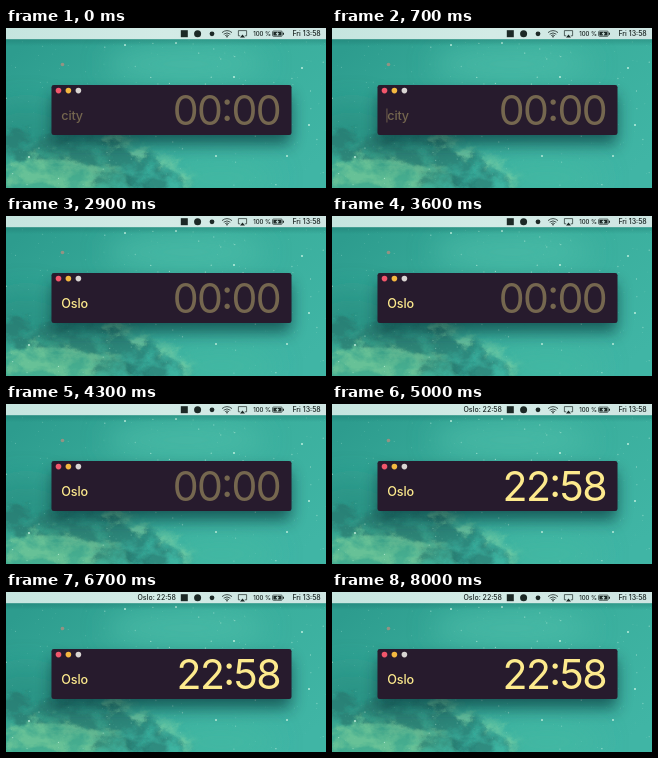
An HTML page that plays this animation: 320 px wide and 160 px high, repeating every 8.1 s.

```html
<!DOCTYPE html>
<html lang="en">
<head>
<meta charset="utf-8">
<title>City clock</title>
<style>
  html, body { margin: 0; width: 100%; height: 100%; overflow: hidden; background: #3aab9b; }
  svg { display: block; width: 100vw; height: 100vh; }
  text { font-family: Inter, Roboto, sans-serif; }
  .bar text { font-size: 7px; font-weight: 500; fill: #17211f; }
  .bar .small { font-size: 6px; }
  #city { font-size: 12.6px; font-weight: 500; letter-spacing: -.15px; }
  #clock { font-size: 41px; letter-spacing: -1.6px; text-anchor: end; font-feature-settings: "case" 1; }
</style>
</head>
<body>
<svg viewBox="0 0 320 160">
  <defs>
    <linearGradient id="sky" x1="0" y1=".2" x2="1" y2=".8">
      <stop offset="0" stop-color="#2d9c8e"/>
      <stop offset=".45" stop-color="#39ad9b"/>
      <stop offset="1" stop-color="#40b5a5"/>
    </linearGradient>
    <linearGradient id="glass">
      <stop offset="0" stop-color="#c5e5df"/>
      <stop offset=".5" stop-color="#d3ebe6"/>
      <stop offset="1" stop-color="#cee5e2"/>
    </linearGradient>
    <linearGradient id="edge" x1="0" y1="0" x2="0" y2="1">
      <stop offset="0" stop-color="#176b62" stop-opacity=".35"/>
      <stop offset="1" stop-color="#176b62" stop-opacity="0"/>
    </linearGradient>
    <filter id="soft" x="-60%" y="-60%" width="220%" height="220%"><feGaussianBlur stdDeviation="13"/></filter>
    <filter id="mist" x="-20%" y="-30%" width="140%" height="160%">
      <feTurbulence type="fractalNoise" baseFrequency=".05 .065" numOctaves="5" seed="7" result="noise"/>
      <feGaussianBlur in="SourceGraphic" stdDeviation="2.5" result="cloud"/>
      <feDisplacementMap in="cloud" in2="noise" scale="30" xChannelSelector="R" yChannelSelector="G" result="torn"/>
      <feColorMatrix in="noise" values="0 0 0 0 1  0 0 0 0 1  0 0 0 0 1  3 0 0 0 -.8" result="mask"/>
      <feComposite in="torn" in2="mask" operator="in"/>
    </filter>
    <filter id="shade" x="-20%" y="-80%" width="140%" height="280%"><feGaussianBlur stdDeviation="7.5"/></filter>
  </defs>

  <rect width="320" height="160" fill="url(#sky)"/>
  <g filter="url(#soft)">
    <ellipse cx="180" cy="36" rx="80" ry="20" fill="#50c0aa" opacity=".6"/>
    <ellipse cx="215" cy="150" rx="55" ry="20" fill="#45bba4" opacity=".6"/>
    <ellipse cx="20" cy="100" rx="40" ry="25" fill="#238578" opacity=".5"/>
    <ellipse cx="80" cy="124" rx="55" ry="14" fill="#267f70" opacity=".6"/>
    <ellipse cx="45" cy="152" rx="65" ry="16" fill="#50b18d" opacity=".8"/>
  </g>
  <g filter="url(#mist)">
    <path d="M0 98Q35 104 62 110T125 114Q143 118 153 132T188 160H100Q75 135 0 125Z" fill="#24746a" opacity=".6"/>
    <path d="M0 138Q30 124 60 131T112 140L130 160H0Z" fill="#74c99a" opacity=".75"/>
    <path d="M98 112Q135 112 151 126T185 156" fill="none" stroke="#79cfa4" stroke-width="9" opacity=".75"/>
    <path d="M90 151Q110 136 135 150T155 160H90Z" fill="#247a70" opacity=".7"/>
  </g>
  <g id="stars" fill="#c8f5e3"></g>
  <circle cx="56.5" cy="36.5" r="1.8" fill="#b58d7e" opacity=".75"/>

  <rect y="11" width="320" height="7" fill="url(#edge)"/>
  <rect width="320" height="11.2" fill="url(#glass)"/>
  <g class="bar">
    <text id="menu" x="131.5" y="8.3">Oslo: 22:58</text>
    <g fill="#1c2926">
      <rect x="174.8" y="2.2" width="7" height="7"/>
      <circle cx="191.6" cy="5.7" r="3.5"/>
      <circle cx="206" cy="5.8" r="2.4"/>
      <circle cx="221" cy="8.7" r=".8"/>
    </g>
    <g fill="none" stroke="#1c2926">
      <path d="M216 4.6Q221 .6 226 4.6M217.7 6.2Q221 3.6 224.3 6.2M219.2 7.6Q221 6.3 222.8 7.6" stroke-width=".8"/>
      <path d="M234.2 7.8H232.4V2.6H240.6V7.8H238.8" stroke-width=".7"/>
      <rect x="266.6" y="3.1" width="9.6" height="5.2" rx=".9" stroke-width=".7"/>
    </g>
    <path d="M234 9.6L236.5 6.5L239 9.6ZM267.4 3.9H275.4V7.5H267.4ZM276.9 4.8H278V6.8H276.9Z" fill="#1c2926"/>
    <path d="M272 3.2L269.5 6.2H271.2L270.6 8.4L273.3 5.3H271.5Z" fill="#d3ebe6"/>
    <text class="small" x="247.2" y="8.1">100 %</text>
    <text x="286.4" y="8.3">Fri 13:58</text>
  </g>

  <rect x="46" y="67" width="239" height="49" rx="4" fill="#06272d" opacity=".6" filter="url(#shade)"/>
  <rect x="45.5" y="57" width="240" height="50" rx="2.3" fill="#271b2d"/>
  <circle cx="52.5" cy="62.6" r="2.8" fill="#f2566b"/>
  <circle cx="62.4" cy="62.6" r="2.8" fill="#f4b840"/>
  <circle cx="72.4" cy="62.6" r="2.8" fill="#d9d5d3"/>
  <text id="city" x="55.3" y="92"></text>
  <rect id="caret" y="80.5" width=".7" height="14" fill="#8b7957"/>
  <text id="clock" x="274" y="97"></text>
</svg>
<script>
  const LOOP = 8100, FRAME = 100, NAME = 'Oslo';
  const TYPE_START = 1200, KEY_GAP = 300, RESULT = 4600;
  const DIM = '#75674f', BRIGHT = '#fdea8d';
  const $ = id => document.getElementById(id);
  const city = $('city'), clock = $('clock'), caret = $('caret'), menu = $('menu');

  let seed = 41;
  const random = () => (seed = seed * 16807 % 2147483647) / 2147483647;

  function star(x, y, r, opacity) {
    const dot = document.createElementNS('http://www.w3.org/2000/svg', 'circle');
    for (const [key, value] of Object.entries({ cx: x, cy: y, r, opacity })) dot.setAttribute(key, value);
    $('stars').append(dot);
  }
  for (let i = 0; i < 230; i++) {
    star(random() * 320, 12 + random() * 148, .25 + random() ** 3 * .55, .25 + random() * .5);
  }
  [[119, 17], [228, 49], [170, 15], [296, 40], [23, 129], [210, 128], [281, 128], [303, 97]]
    .forEach(([x, y]) => star(x, y, 1, .9));

  function setText(node, value) {
    if (node.textContent !== value) node.textContent = value;
  }

  function update(time) {
    const t = Math.floor(time % LOOP / FRAME) * FRAME;
    const count = Math.max(0, Math.min(NAME.length, Math.floor((t - TYPE_START) / KEY_GAP) + 1));
    const done = t >= RESULT;
    setText(city, count ? NAME.slice(0, count) : 'city');
    city.setAttribute('fill', count ? BRIGHT : DIM);
    setText(clock, done ? '22:58' : '00:00');
    clock.setAttribute('fill', done ? BRIGHT : DIM);
    menu.setAttribute('visibility', done ? 'visible' : 'hidden');
    caret.setAttribute('x', count ? 55.5 + city.getComputedTextLength() : 54.6);
    caret.setAttribute('visibility', t >= 600 && t < 2600 ? 'visible' : 'hidden');
  }

  function tick(now) {
    update(now);
    requestAnimationFrame(tick);
  }
  update(0);
  requestAnimationFrame(tick);
</script>
</body>
</html>
```
